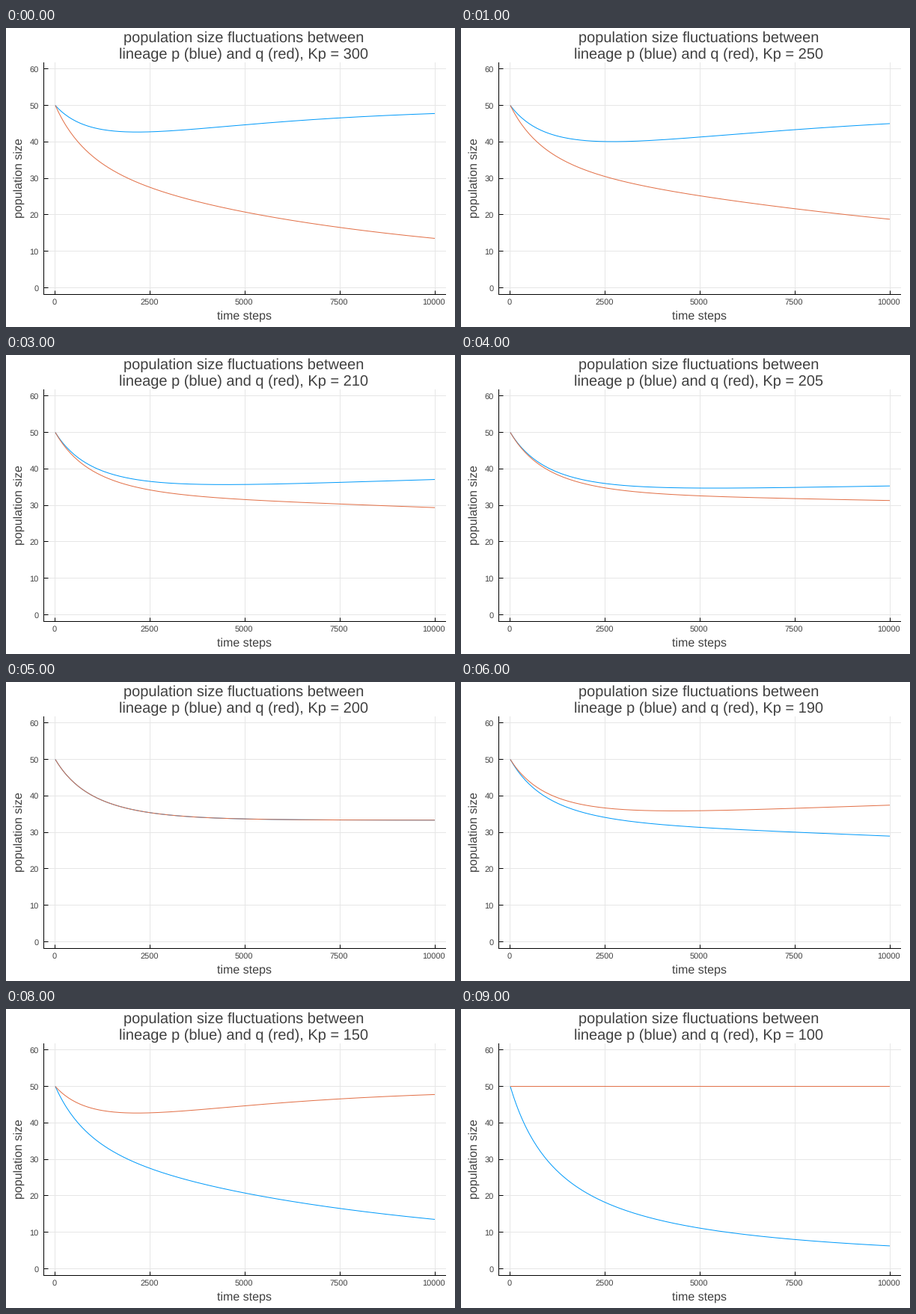
Write a matplotlib script that moves like this. It is 600 by 400 pixels and loops after 10 s.

```python
import numpy as np
import matplotlib.pyplot as plt
from matplotlib.animation import FuncAnimation

plt.rcParams["font.family"] = "Liberation Sans"
plt.rcParams["text.hinting"] = "none"
plt.rcParams["text.hinting_factor"] = 1
plt.rcParams["path.snap"] = False

W, H, DPI = 600, 400, 100
PT = 72 / DPI                      # points per pixel
BLUE, RED, INK, GRID = "#009AFA", "#E26F46", "#404040", "#E6E6E6"
CAPACITIES = [300, 250, 220, 210, 205, 200, 190, 180, 150, 100]
STEPS, START, RATE = 10000, 50.0, 7e-4


def simulate(kp):
    """Competition of two lineages; pressure is shared by weighted size."""
    kp = np.asarray(kp, float)
    p = np.ones_like(kp)
    q = np.ones_like(kp)
    rows = [(p, q)]
    for step in range(1, STEPS + 1):
        share = 100 * q / ((kp - 100) * p + 100 * q)
        dp = RATE * p * (1 - p - share * q)
        dq = RATE * q * (1 - q - (1 - share) * p)
        p, q = p + dp, q + dq
        if step % 50 == 0:
            rows.append((p, q))
    return START * np.array(rows)   # time, lineage, capacity


def px(t):
    return 65.9 + 0.05071 * np.asarray(t)


def py(n):
    return 347.4 - 4.877 * np.asarray(n)


def cell(v):
    """Centre of the pixel that holds v."""
    return float(np.floor(v)) + 0.5


fig = plt.figure(figsize=(W / DPI, H / DPI), dpi=DPI, facecolor="white")
ax = fig.add_axes([0, 0, 1, 1])
ax.set_xlim(0, W)
ax.set_ylim(H, 0)
ax.axis("off")


def line(x, y, color, z=1):
    return ax.plot(x, y, color=color, lw=PT, zorder=z,
                   solid_capstyle="butt")[0]


def label(x, y, text, size, ha="center", rotation=0):
    return ax.text(x, y, text, fontsize=size * PT, color=INK, ha=ha,
                   va="baseline", rotation=rotation, rotation_mode="anchor")


LEFT, RIGHT, TOP, BOTTOM = 50.5, 588, 46, 356.5

for t in range(0, STEPS + 1, 2500):
    x = cell(px(t))
    line([x, x], [TOP, BOTTOM], GRID)
    line([x, x], [BOTTOM, BOTTOM - 5], "black", 2)
    label(px(t) - 1.3, 370, str(t), 11.5)

for n in range(0, 61, 10):
    y = cell(py(n))
    line([LEFT, RIGHT], [y, y], GRID)
    line([LEFT, LEFT + 6], [y, y], "black", 2)
    label(43.5, py(n) + 4, str(n), 11.5, ha="right")

line([LEFT, LEFT], [TOP, BOTTOM + 0.5], "black", 2)
line([LEFT - 0.5, RIGHT], [BOTTOM, BOTTOM], "black", 2)

label(317.2, 19, "population size fluctuations between", 20)
title = label(317.6, 41, "", 19.7)
label(318.8, 389.5, "time steps", 15.7)
label(21.8, 201, "population size", 15.7, rotation=90)

sizes = simulate(CAPACITIES)
times = px(np.linspace(0, STEPS, len(sizes)))
p_line = line(times, py(sizes[:, 0, 0]), BLUE, 3)
q_line = line(times, py(sizes[:, 1, 0]), RED, 4)


def update(i):
    p_line.set_ydata(py(sizes[:, 0, i]))
    q_line.set_ydata(py(sizes[:, 1, i]))
    title.set_text(f"lineage p (blue) and q (red), Kp = {CAPACITIES[i]}")
    return p_line, q_line, title


anim = FuncAnimation(fig, update, frames=len(CAPACITIES), interval=1000,
                     repeat=True, repeat_delay=0)
plt.show()
```
